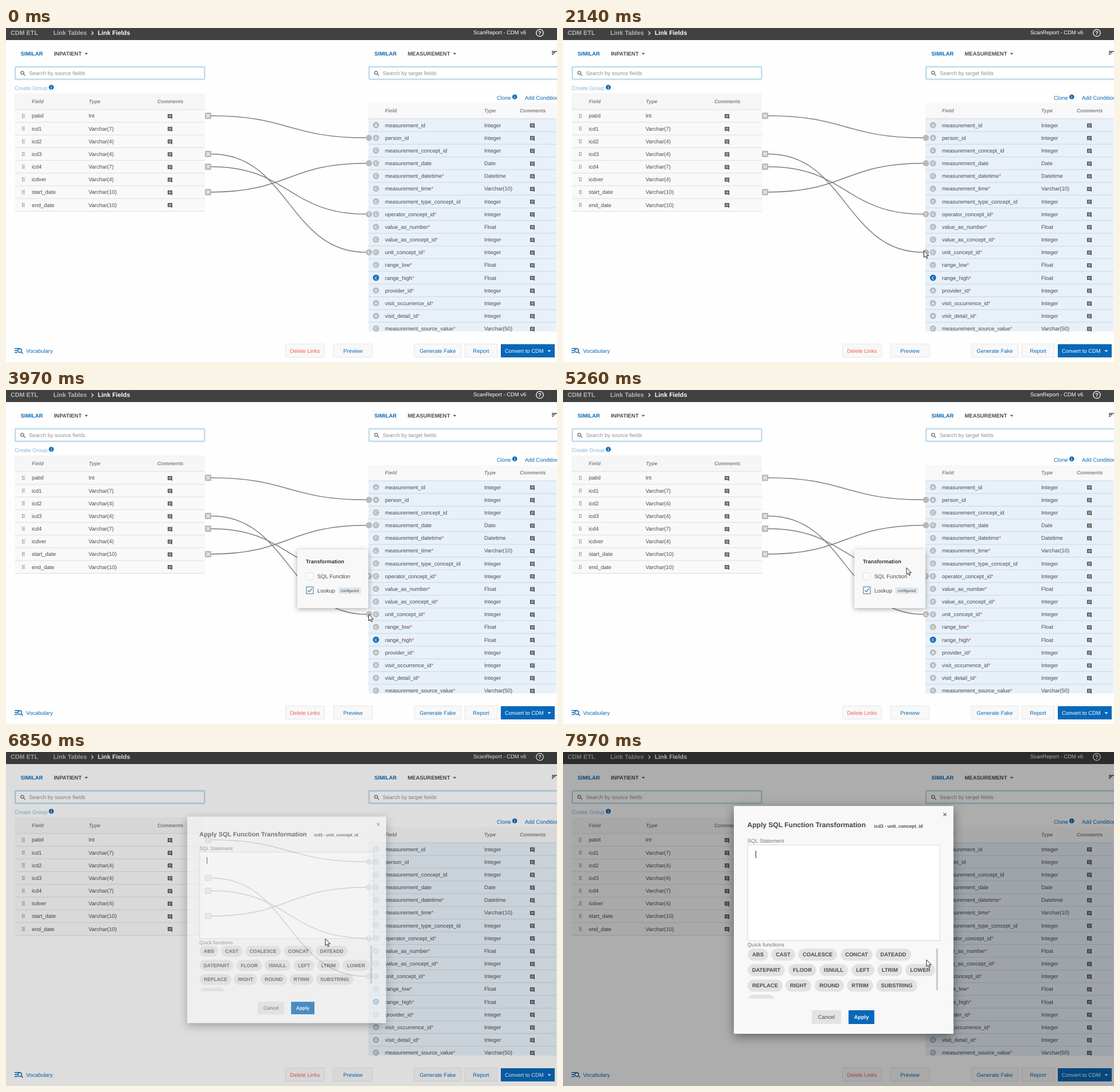
An HTML page for the animation above (8000 ms loop, 961 by 582 pixels).

```html
<!DOCTYPE html>
<html lang="en">
<head>
<meta charset="utf-8">
<title>Link Fields</title>
<style>
html, body { margin: 0; width: 100%; height: 100%; overflow: hidden; background: #fefefe; }
svg { display: block; width: 961px; height: 582px; }
text { font-family: "Liberation Sans", Arial, sans-serif; font-size: 9.45px; fill: #4b4b4b; text-rendering: geometricPrecision; white-space: pre; }
.b { font-weight: bold; }
.head { font-size: 8.8px; font-weight: bold; font-style: italic; fill: #858585; }
.blue { fill: #0a69b5; }
.mid { text-anchor: middle; }
.shadow { filter: drop-shadow(0 2px 5px rgba(0,0,0,.32)); }
.deep { filter: drop-shadow(0 5px 9px rgba(0,0,0,.42)); }
.glow { filter: drop-shadow(0 0 1.5px #9fd0ea); }
</style>
</head>
<body>
<svg viewBox="0 0 961 582" xmlns="http://www.w3.org/2000/svg">
  <defs>
    <g id="note"><path d="M-4-4H4V4.6L2 3H-4Z" fill="#505050"/><path d="M-2.5-2H2.5M-2.5-.5H2.5M-2.5 1H2.5" stroke="#eee" stroke-width=".7"/></g>
    <g id="grip" fill="#666"><path d="M-2-3.2h1.4v1.4H-2zM.8-3.2h1.4v1.4H.8zM-2-.6h1.4v1.4H-2zM.8-.6h1.4v1.4H.8zM-2 2h1.4v1.4H-2zM.8 2h1.4v1.4H.8z"/></g>
    <g id="lens" fill="none" stroke="#6b6b6b" stroke-width="1.3"><circle cx="-1" cy="-1" r="2.7"/><path d="M1 1L4 4"/></g>
    <g id="info"><circle r="4.3" fill="#0a69b5"/><path d="M0-2.6V-1.4M0-.5V2.6" stroke="#fff" stroke-width="1.2"/></g>
    <g id="unlink"><rect x="-5.5" y="-5.5" width="11" height="11" rx="1" fill="#b9b9b9"/><path d="M-3-3L3 3M3-3L-3 3" stroke="#fff" stroke-width="1.3"/></g>
    <clipPath id="chipView"><rect x="320" y="340" width="332" height="89.5"/></clipPath>
    <clipPath id="tableView"><rect x="631" y="130" width="330" height="399"/></clipPath>
  </defs>
  <g id="page"></g>
  <g id="popup"></g>
  <rect id="backdrop" width="961" height="582" opacity="0"/>
  <g id="modal"></g>
  <path id="cursor" d="M0 0V11.8L2.7 9.3 4.5 13.4 6.4 12.6 4.6 8.6H8.4Z" fill="#fff" stroke="#111" stroke-width=".9"/>
</svg>
<script>
const $ = id => document.getElementById(id);
const BLUE = '#0768b9';

const text = (x, y, s, cls = '', style = '') =>
  `<text x="${x}" y="${y + 3.4}" class="${cls}" style="${style}">${s}</text>`;
const box = (x, y, w, h, fill, extra = '') =>
  `<rect x="${x}" y="${y}" width="${w}" height="${h}" fill="${fill}" ${extra}/>`;
const line = (d, color, width = 1) =>
  `<path d="${d}" fill="none" stroke="${color}" stroke-width="${width}"/>`;
const use = (id, x, y) => `<use href="#${id}" x="${x}" y="${y}"/>`;
const arrow = (x, y, fill) => `<path d="M${x - 3} ${y - 1.5}h6l-3 3z" fill="${fill}"/>`;
const badge = (x, y, s = '', fill = '#b9b9b9') =>
  `<circle cx="${x}" cy="${y}" r="5.4" fill="${fill}"/>` +
  text(x, y - .8, s, 'b mid', 'font-size:7px;fill:#fff');
const button = (x, w, s, color) =>
  box(x + .5, 550.5, w - 1, 23, '#f8f8f8', 'stroke="#e6e6e6" rx="1"') +
  text(x + w / 2, 562.5, s, 'mid', `fill:${color}`);

const PITCH = 22.16;
const leftY = i => 153 + i * PITCH;
const rightY = i => 169.2 + i * PITCH;

const sources = [['patid', 'Int'], ['icd1', 'Varchar(7)'], ['icd2', 'Varchar(4)'], ['icd3', 'Varchar(4)'],
  ['icd4', 'Varchar(7)'], ['icdver', 'Varchar(4)'], ['start_date', 'Varchar(10)'], ['end_date', 'Varchar(10)']];
const targets = [['measurement_id', 'Integer'], ['person_id', 'Integer'], ['measurement_concept_id', 'Integer'],
  ['measurement_date', 'Date'], ['measurement_datetime*', 'Datetime'], ['measurement_time*', 'Varchar(10)'],
  ['measurement_type_concept_id', 'Integer'], ['operator_concept_id*', 'Integer'], ['value_as_number*', 'Float'],
  ['value_as_concept_id*', 'Integer'], ['unit_concept_id*', 'Integer'], ['range_low*', 'Float'],
  ['range_high*', 'Float'], ['provider_id*', 'Integer'], ['visit_occurrence_id*', 'Integer'],
  ['visit_detail_id*', 'Integer'], ['measurement_source_value*', 'Varchar(50)']];
const badges = 'AACCCCCCCCCCCAAAC';
const links = [[0, 1, ''], [3, 10, 'L'], [4, 7, 'T'], [6, 3, '']];

function header() {
  return box(0, 0, 961, 21, '#414141') +
    text(8, 9, 'CDM ETL', 'b', 'font-size:10.8px;fill:#b4b4b4') +
    text(82.5, 9, 'Link Tables', 'b', 'font-size:10.8px;fill:#b4b4b4') +
    line('M149 6L152 9 149 12', '#ddd', 1.5) +
    text(160, 9, 'Link Fields', 'b', 'font-size:10.8px;fill:#fff') +
    text(815, 8, 'ScanReport - CDM v6', '', 'fill:#fff') +
    '<circle cx="931" cy="8.5" r="6.2" fill="none" stroke="#fff" stroke-width="1.3"/>' +
    text(931, 8.5, '?', 'b mid', 'font-size:9.5px;fill:#fff');
}

function pane(x, table, arrowX, width, hint) {
  return text(x + 9.5, 45, 'SIMILAR', 'b blue') + text(x + 67.5, 45, table, 'b') + arrow(arrowX, 45, '#555') +
    box(x + .5, 68, width, 21, '#fff', 'stroke="#92c5de" class="glow"') +
    use('lens', x + 13.5, 79) + text(x + 24, 78.5, hint, '', 'fill:#8f8f8f');
}

function leftTable() {
  const rows = sources.map(([name, type], i) => {
    const y = leftY(i);
    return line(`M15 ${y - 11}H347`, '#dedede') + use('grip', 30, y) + text(45, y, name) +
      text(144, y, type) + use('note', 286, y + 1);
  });
  return text(15, 104.5, 'Create Group', '', 'fill:#82b9dc') + use('info', 79, 103.3) +
    box(15, 114, 332, 206, '#f9f9f9') + box(15, 114, 332, 28, '#f6f6f6') +
    text(45, 128, 'Field', 'head') + text(144.5, 128, 'Type', 'head') + text(264, 128, 'Comments', 'head') +
    rows.join('') + line('M15 319.5H347', '#dedede');
}

function rightTable() {
  const rows = targets.map(([name, type], i) => {
    const y = rightY(i);
    return line(`M632 ${y - 11}H960`, '#cbd7e2') + badge(645.3, y, badges[i], i === 12 ? BLUE : undefined) +
      text(661, y, name.replace('*', '<tspan fill="#e8402f">*</tspan>')) +
      text(834, y, type) + use('note', 918, y + 1);
  });
  return text(856, 121.5, 'Clone', 'blue') + use('info', 887.3, 120) + text(905, 121.5, 'Add Conditions', 'blue') +
    '<g clip-path="url(#tableView)">' + box(632, 131, 328, 400, '#e8f1f9') + box(632, 131, 328, 27, '#f8f8f8') +
    text(661, 144, 'Field', 'head') + text(834, 144, 'Type', 'head') + text(896, 144, 'Comments', 'head') +
    rows.join('') + '</g>';
}

function linkLayer() {
  return links.map(([from, to, mark]) => {
    const a = leftY(from), b = rightY(to);
    return line(`M358 ${a}C493 ${a} 493 ${b} 628 ${b}`, '#7d7d7d', 1.5) +
      use('unlink', 352.5, a) + badge(633, b, mark);
  }).join('');
}

function footer() {
  return line('M15 558.5H24M15 562H20M15 565.5H20', BLUE, 1.4) +
    `<circle cx="24" cy="562" r="3.3" fill="none" stroke="${BLUE}" stroke-width="1.4"/>` +
    line('M26.3 564.3L29.5 567.5', BLUE, 1.5) + text(35, 562.5, 'Vocabulary', 'blue') +
    button(487, 69, 'Delete Links', '#f0604f') + button(570.5, 69, 'Preview', '#0a69b5') +
    button(711.5, 83, 'Generate Fake', '#0a69b5') + button(799.5, 58, 'Report', '#0a69b5') +
    box(863, 551, 94, 23, BLUE) + text(870, 562.5, 'Convert to CDM', '', 'fill:#fff') + arrow(947.5, 563, '#fff');
}

$('page').innerHTML = box(0, 0, 961, 582, '#fefefe') + header() +
  pane(16, 'INPATIENT', 140, 329.5, 'Search by source fields') +
  pane(633, 'MEASUREMENT', 782.5, 340, 'Search by target fields') +
  line('M952 40.7H961M952 43.2H958M952 45.7H955', '#444', 1.4) +
  leftTable() + rightTable() + linkLayer() + footer();

$('popup').innerHTML = box(508, 278, 124, 102, '#f8f8f8', 'class="shadow" rx="1"') +
  text(523, 299, 'Transformation', 'b', 'font-size:9.2px;fill:#333') +
  box(524, 318.5, 12, 12, '#fafafa', 'stroke="#e4e4e4"') + text(543, 325, 'SQL Function') +
  box(524, 343, 12, 12, '#fff', 'stroke="#356f9c"') + line('M526.5 349L529 351.8 533.8 346', '#356f9c', 1.2) +
  text(543, 350, 'Lookup') + box(580, 344, 39, 11, '#dee6ee') +
  text(599.5, 348.8, 'configured', 'mid', 'font-size:6.7px');

const chips = [
  [353, ['ABS', 322, 36], ['CAST', 363, 42], ['COALESCE', 410, 68], ['CONCAT', 484, 56], ['DATEADD', 545, 62]],
  [380, ['DATEPART', 322, 65], ['FLOOR', 393, 49], ['ISNULL', 447, 50], ['LEFT', 503, 40], ['LTRIM', 548, 44], ['LOWER', 597, 52]],
  [407, ['REPLACE', 322, 61], ['RIGHT', 388, 45], ['ROUND', 439, 51], ['RTRIM', 495, 46], ['SUBSTRING', 546, 72]],
  [433.5, ['', 322, 48]]
];
const chip = (y, [name, x, w]) =>
  box(x, y - 10.5, w, 21, '#e2e2e2', 'rx="10.5"') + text(x + w / 2, y, name, 'b mid', 'font-size:9.4px');

$('modal').innerHTML = box(298, 94, 383, 397, '#f8f8f8', 'class="deep"') +
  line('M663.3 106.2L668.7 111.6M668.7 106.2L663.3 111.6', '#555', 1.1) +
  text(321.5, 128, 'Apply SQL Function Transformation', 'b', 'font-size:12.05px;fill:#444') +
  text(542.5, 128.5, 'icd3 - unit_concept_id', 'b', 'font-size:8.05px') +
  text(321.5, 154.5, 'SQL Statement', '', 'fill:#777') +
  box(322, 162, 335, 166.5, '#fff', 'stroke="#d8d8d8"') +
  box(335.8, 172, 1, 13, '#222', 'id="caret"') +
  text(321.5, 336, 'Quick functions', '', 'fill:#777') +
  '<g clip-path="url(#chipView)">' + chips.map(([y, ...row]) => row.map(c => chip(y, c)).join('')).join('') + '</g>' +
  box(650.8, 342.5, 3.2, 72.5, '#cbcbcb') +
  box(434, 450, 51, 24, '#e3e3e3', 'rx="1"') + text(459.5, 462, 'Cancel', 'mid') +
  box(498, 450, 45, 24, BLUE, 'rx="1"') + text(520.5, 462, 'Apply', 'b mid', 'fill:#fff;font-size:9.2px');

// Pointer path: time, x, y
const path = [[1210, 928, 557], [1400, 850, 490], [1650, 715, 408], [1800, 661, 377], [1955, 668, 396],
  [2020, 650, 391], [2140, 629.5, 388], [2450, 629.5, 388], [2770, 634, 389], [3030, 634, 390], [3530, 634, 390],
  [3650, 632.5, 390.5], [3970, 632.5, 390.5], [4090, 624, 364], [4210, 635, 343], [4400, 634, 341],
  [4650, 570, 326], [4850, 517, 318], [5010, 545, 310], [5190, 602, 309], [5260, 598, 310], [5560, 555, 326],
  [6180, 555, 326], [6240, 557, 325.5], [7530, 557, 325.5], [7750, 596, 343], [7960, 634, 362]];

function pointerAt(t) {
  const i = path.findIndex(p => p[0] > t);
  if (i < 0) return path[path.length - 1].slice(1);
  const [t0, x0, y0] = path[i - 1], [t1, x1, y1] = path[i];
  const u = (t - t0) / (t1 - t0);
  return [x0 + (x1 - x0) * u, y0 + (y1 - y0) * u];
}

// Value of the last step that has begun
const stepAt = (steps, t) => steps.reduce((v, [at, next]) => t >= at ? next : v, 0);
const dimSteps = [[6845, .4], [6905, .72], [6970, .885], [7030, .954], [7095, .985], [7155, 1]];
const openSteps = [[6845, .687], [6905, .937], [6970, 1]];

const LOOP = 8000, FIRST = 1210, TICK = 62;

function draw(time) {
  const t = time % LOOP;
  const ticked = FIRST + TICK * Math.floor((t - FIRST + 5) / TICK);
  const shown = t >= FIRST;
  $('cursor').style.display = shown ? '' : 'none';
  if (shown) $('cursor').setAttribute('transform', `translate(${pointerAt(ticked)})`);

  const open = stepAt(openSteps, t);
  $('popup').style.display = t >= 3530 && !open ? '' : 'none';
  $('backdrop').setAttribute('opacity', .32 * stepAt(dimSteps, t));
  $('modal').style.display = open ? '' : 'none';
  $('modal').setAttribute('opacity', open);
  $('modal').setAttribute('transform', `translate(489.5 292.4) scale(${.7 + .3 * open}) translate(-489.5 -292.4)`);
  $('caret').style.display = t >= 7405 && t < 7905 ? 'none' : '';
}

let start;
function loop(now) {
  start ??= now;
  draw(Math.max(0, now - start));
  requestAnimationFrame(loop);
}
draw(0);
requestAnimationFrame(loop);
</script>
</body>
</html>
```
